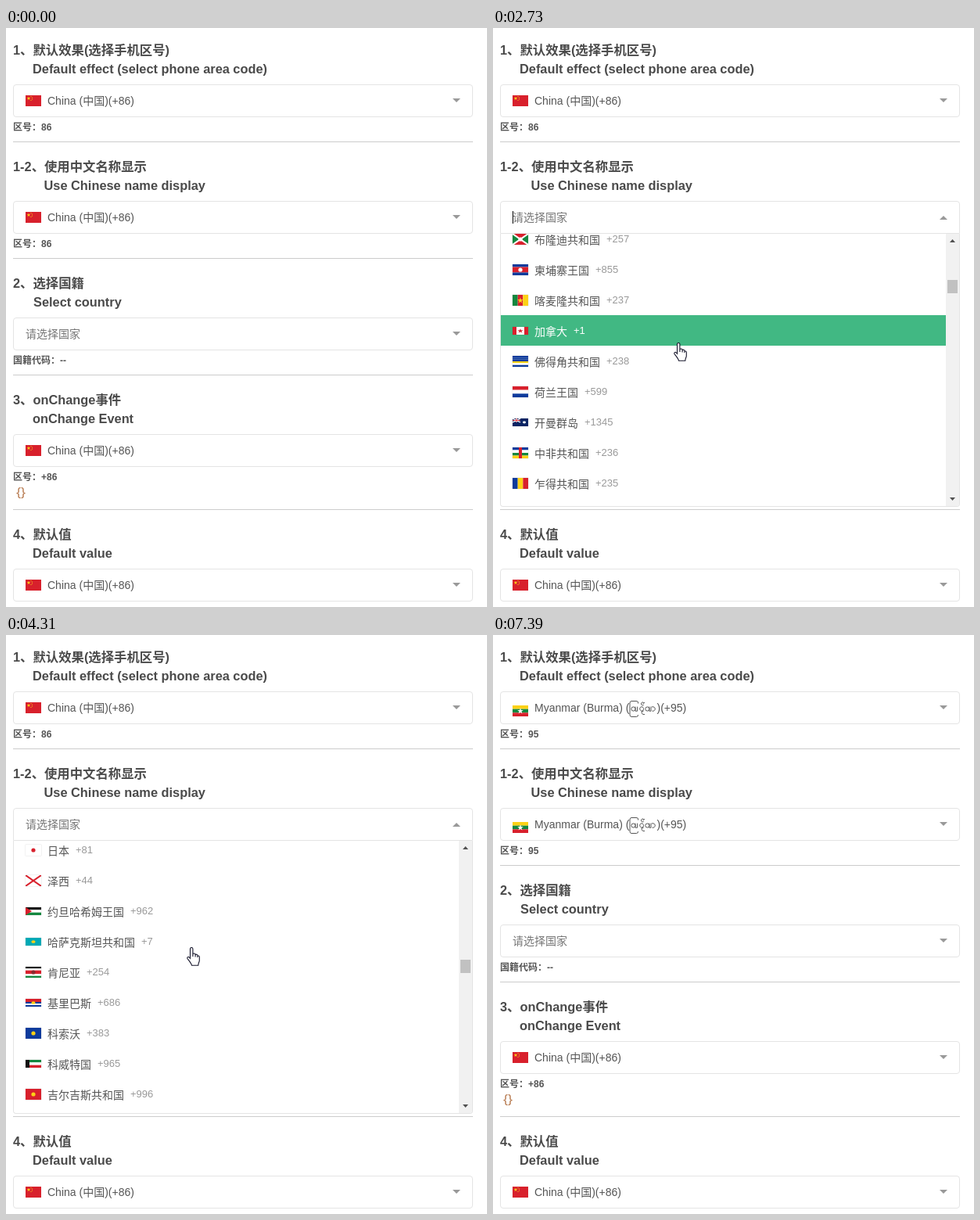
An HTML page for the animation above (8.02 s loop, 615 by 740 pixels).

```html
<!DOCTYPE html>
<html lang="zh-CN">
<head>
<meta charset="utf-8">
<title>Country select</title>
<style>
html, body { margin: 0; width: 100%; height: 100%; overflow: hidden; background: #fff; }
body { position: relative; color: #555; font: 14px "Liberation Sans", Arial, "Noto Sans CJK SC", "Noto Sans CJK", sans-serif; }
div, svg.at { position: absolute; white-space: nowrap; box-sizing: border-box; }
.title { font-weight: bold; font-size: 16.38px; line-height: 24px; color: #4a4a4a; }
.note { left: 9px; font-weight: bold; font-size: 12px; line-height: 18px; }
.rule { left: 9px; width: 588px; height: 1px; background: #ccc; }
.select { left: 9px; width: 588px; height: 42px; border: 1px solid #e4e4e4; border-radius: 4px; line-height: 40px; }
.select.open { border-radius: 4px 4px 0 0; }
.hint { left: 15px; color: #757575; }
.label { left: 43px; }
.caret { left: 15px; top: 12px; width: 1px; height: 16px; background: #000; }
.arrow { left: 561px; top: 17px; width: 10px; height: 5px; background: #999; clip-path: polygon(0 0, 100% 0, 50% 100%); }
.turn { left: 0; top: 0; width: 586px; height: 40px; transform-origin: 566px 20px; }
.list { left: 9px; top: 263px; width: 588px; height: 349px; background: #fff; border: 1px solid #e4e4e4; border-top: 0; border-radius: 0 0 4px 4px; overflow: hidden; }
.row { left: 0; width: 569px; height: 39px; padding-left: 15px; display: flex; align-items: center; }
.row svg { margin-right: 8px; box-shadow: 0 0 1px rgba(0, 0, 0, .3); }
.row i { font: 13px "Liberation Sans", Arial, sans-serif; color: #999; margin-left: 8px; }
.row.on { background: #41b883; color: #fff; }
.row.on i { color: #fff; }
.bar { left: 569px; top: 0; width: 17px; height: 348px; background: #f1f1f1; }
.thumb { left: 2px; width: 13px; height: 17px; background: #c1c1c1; }
.tip { left: 5px; width: 7px; height: 4px; background: #505050; }
.code { left: 13px; top: 583px; line-height: 20px; font: 300 16px/20px "Noto Sans", sans-serif; color: #b5764a; }
</style>
</head>
<body>
<script>
const LOOP = 8020, ROW = 39, FIRST = 23;

// name, dial code, flag: (= low | - narrow) stripe direction, stripe colours, then shape + colour pairs
const COUNTRIES = `不丹王国 975 hYfOoW,玻利维亚国 591 hRYG,波斯尼亚和黑塞哥维那 387 =hBjY,博茨瓦纳 267 hLLLWKWLLL,巴西联邦共和国 55 hGrYoB,
英属印度洋领地 246 =hLWLWLWLkR,英属维尔京群岛 1284 =hNkReW,文莱达鲁萨兰国 673 =hYgKoR,保加利亚共和国 359 hWGR,布基纳法索 226 hRGsY,
布隆迪共和国 257 hRyGxWoW,柬埔寨王国 855 hBRRBoW,喀麦隆共和国 237 vGRYsY,加拿大 1 =vRWWRsR,佛得角共和国 238 hBBBYWB,
荷兰王国 599 hRWB,开曼群岛 1345 =hNkReW,中非共和国 236 hBWGYwR,乍得共和国 235 vBYR,智利 56 hWRcB,
中国 86 hRaY,圣诞岛 61 =hBfGoY,科科斯群岛 61 =hGoY,哥伦比亚 57 hYYBR,科摩罗 269 hYWRBtG,
刚果民主共和国 243 hLdRaY,刚果共和国 242 hGfRdY,库克群岛 682 =hNkReW,哥斯达黎加 506 hBWRRWB,科特迪瓦 225 vOWG,
克罗地亚 385 =hRWBoR,古巴 53 =hBWBWBtR,库拉索 599 hBBBBYB,塞浦路斯 357 hWoO,捷克共和国 420 hWRtB,
丹麦 45 hRpW,吉布提共和国 253 hLGtW,多米尼克国 1767 =hGmYoR,多米尼加共和国 1 hBzRmW,厄瓜多尔 593 hYYBRoM,
埃及 20 hRWKoY,萨尔瓦 503 =hBWBoL,赤道几内亚 240 hGWRtB,厄立特里亚 291 =hGLiR,爱沙尼亚共和国 372 hLKW,
埃塞俄比亚 251 =hGYRoB,福克兰群岛 500 =hNkReW,法罗群岛 298 hWpR,斐济 679 =hLkReW,芬兰 358 hWpB,
法国 33 vBWR,法属圭亚那 594 hGfY,法属波利尼西亚 689 hRWWRoY,加蓬 241 hGYB,冈比亚 220 hRBG,
格鲁吉亚 995 hWmR,德国 49 hKRY,加纳 233 hRYGsK,直布罗陀 350 =hWWRoR,希腊 30 hBWBWBWBWBcB,
格陵兰 299 hWRoR,格林纳达 1473 hYGoR,瓜德罗普 590 hKGoY,关岛 1671 hBoW,危地马拉 502 vLWL,
根西岛 44 hWmR,几内亚 224 vRYG,几内亚比绍 245 =hYGbR,圭亚那 592 hGiYtR,海地 509 hBRoW,
洪都拉斯 504 =hBWBoB,香港 852 hRoW,匈牙利 36 =hRWG,冰岛 354 hBpR,印度 91 hOWGoB,
印度尼西亚 62 hRW,伊朗 98 hGWRoR,伊拉克 964 hRWKoG,爱尔兰 353 =vGWO,马恩岛 44 =hRoW,
以色列 972 hBWWWBsB,意大利 39 vGWR,牙买加 1876 =hGyKxY,日本 81 hWoR,泽西 44 hWxR,
约旦哈希姆王国 962 =hKWGtR,哈萨克斯坦共和国 7 =hToY,肯尼亚 254 hKWRRWGoM,基里巴斯 686 =hRRBWBoY,科索沃 383 hBoY,
科威特国 965 =hGWRbK,吉尔吉斯共和国 996 hRoY,老挝 856 hRBBRoW,拉脱维亚 371 =hMMWMM,黎巴嫩 961 hRWWRoG,
莱索托 266 hBWGoK,利比里亚 231 =hRWRWRWRWRcB,利比亚 218 =hRKKGoW,列支敦士登 423 hBR,立陶宛 370 hYGR,
卢森堡 352 hRWL,澳门 853 hGoW,马其顿 389 =hRxYoY,马达加斯加 261 hRGbW,马拉维 265 hKRG,
马来西亚 60 =hRWRWRWRWcB,马尔代夫 960 hRoG,马里 223 vGYR,马耳他 356 vWR,马绍尔群岛 692 =hBdO,
马提尼克 596 hBmW,毛里塔尼亚 222 hGoY,毛里求斯 230 hRBYG,马约特 262 vBWR,墨西哥 52 =vGWRoO,
密克罗尼西亚 691 =hLoW,摩尔多瓦 373 =vBYRoM,摩纳哥 377 hRW,蒙古 976 =vRBR,黑山 382 =hRoY,
蒙特塞拉特岛 1664 =hNkReW,摩洛哥 212 hR,莫桑比克 258 hGKYtR,缅甸联邦共和国 95 hYGRsW,纳米比亚 264 hBfGdWnR,
瑙鲁 674 =hNNNYNNN,尼泊尔 977 -hW^R,荷兰 31 hRWB,新喀里多尼亚 687 =hBRGqY,新西兰 64 =hNkReR`.split(/,\s*/).map(s => s.split(' '));

const INK = { R: '#d8202c', W: '#fff', B: '#0d3b9c', G: '#14873f', Y: '#fcd116', K: '#111', L: '#6fb1e0', N: '#0a2463', O: '#f58220', M: '#8a2a30', T: '#00a9b5' };
const fill = d => c => `<path d="${d}" fill="${c}"/>`;
const line = (d, w) => c => `<path d="${d}" stroke="${c}" stroke-width="${w}"/>`;
const dot = (x, y, r) => c => `<circle cx="${x}" cy="${y}" r="${r}" fill="${c}"/>`;
const star = (x, y, r) => {
  const pt = k => [x + r * Math.sin(k * Math.PI * .8), y - r * Math.cos(k * Math.PI * .8)];
  return fill('M' + [0, 1, 2, 3, 4].map(pt).join('L') + 'Z');
};
const SHAPES = {
  o: dot(10, 7, 2.6), q: dot(6.5, 7, 3), e: dot(15, 7, 2), s: star(10, 7.3, 4),
  a: c => star(4, 4, 2.6)(c) + [[7, 1.5], [8.5, 3], [8.5, 5], [7, 6.5]].map(p => dot(...p, .6)(c)).join(''),
  t: fill('M0 0L8 7L0 14Z'), i: fill('M0 0L20 7L0 14Z'), f: fill('M20 0V14H0Z'), j: fill('M6 0H16V14Z'),
  r: fill('M10 1.5L18 7L10 12.5L2 7Z'), y: fill('M0 0L10 7L0 14ZM20 0L10 7L20 14Z'),
  z: fill('M10 0H20V7H10ZM0 7H10V14H0Z'), '^': fill('M0 0L20 7H8L20 14H0Z'),
  c: fill('M0 0H9V7H0Z'), b: fill('M0 0H5V14H0Z'), w: fill('M8 0H12V14H8Z'),
  x: line('M0 0L20 14M20 0L0 14', 2), p: line('M7 0V14M0 7H20', 3), m: line('M10 0V14M0 7H20', 3),
  d: line('M-2 15L22 -1', 5), n: line('M-2 15L22 -1', 3.2), g: line('M0 3L20 11', 3.5),
  k: c => fill('M0 0H10V7H0Z')(INK.N) + line('M0 0L10 7M10 0L0 7M5 0V7M0 3.5H10', 1.6)('#fff') + line('M5 0V7M0 3.5H10', 1)(c)
};

function flag(spec, css = '') {
  const [, size, dir, stripes, extra] = spec.match(/^([=-]?)([hv])([A-Z]+)(.*)$/);
  const n = stripes.length;
  let art = [...stripes].map((c, i) => dir === 'h'
    ? `<rect y="${14 * i / n}" width="20" height="${14 / n}" fill="${INK[c]}"/>`
    : `<rect x="${20 * i / n}" width="${20 / n}" height="14" fill="${INK[c]}"/>`).join('');
  for (const [, op, c] of extra.matchAll(/(.)([A-Z])/g)) art += SHAPES[op](INK[c]);
  return `<svg width="${size === '-' ? 13 : 20}" height="${size === '=' ? 10 : 14}" viewBox="0 0 20 14" preserveAspectRatio="none" ${css}>${art}</svg>`;
}

function add(parent, cls, html = '', style = {}) {
  const el = document.createElement('div');
  el.className = cls;
  el.innerHTML = html;
  Object.assign(el.style, style);
  parent.append(el);
  return el;
}
const px = v => v + 'px';

// Page
const BURMESE = '<svg width="35.2" height="23" viewBox="0 0 35.2 23" fill="none" stroke="#555" style="vertical-align:-8px"><path d="M11.5 4.5V3Q11.5 1.5 9 1.5H3Q1 1.5 1 4V19Q1 21.5 3 21.5H9.5Q11.5 21.5 11.5 19"/><circle cx="5.5" cy="11.5" r="2.6"/><path d="M8 8.6V14.2H10.6V8.6M18.5 14.2C13 15.5 12.5 8.8 16 8.8S19 14 16.5 14.2Q15 19 20 18.5M18.8 3.6A1.9 1.9 0 1 0 18.8 6.2M20 3.4L17.6 4.6M29 8.9C34.6 7.6 34.6 15 29.5 14.2"/><circle cx="23.4" cy="11.5" r="2.6"/><path d="M25.8 8.6V14.2H28V8.6"/></svg>';
const selected = {
  cn: flag('hRaY', 'class="at" style="left:15px;top:13px"') + '<div class="label">China (中国)(+86)</div>',
  mm: flag('hYGRsW', 'class="at" style="left:15px;top:17px"') + `<div class="label">Myanmar (Burma) (${BURMESE})(+95)</div>`,
  none: '<div class="hint">请选择国家</div>'
};
const sections = [
  [16, '1、默认效果(选择手机区号)', 'Default effect (select phone area code)', 34, '区号：86', 129],
  [165, '1-2、使用中文名称显示', 'Use Chinese name display', 48.5, '区号：86', 129],
  [314, '2、选择国籍', 'Select country', 35, '国籍代码：--', 129],
  [463, '3、onChange事件', 'onChange Event', 34, '区号：+86', 152],
  [635, '4、默认值', 'Default value', 34]
].map(([top, zh, en, x, note, rule], i) => {
  add(document.body, 'title', zh, { left: '9px', top: px(top) });
  add(document.body, 'title', en, { left: px(x), top: px(top + 24) });
  const box = add(document.body, 'select', '', { top: px(top + 56) });
  const value = add(box, '', selected[i === 2 ? 'none' : 'cn'], { left: 0, top: 0 });
  const turn = add(box, 'turn');
  add(turn, 'arrow');
  if (rule) add(document.body, 'rule', '', { top: px(top + rule) });
  return { top: top + 56, box, value, turn, note: note && add(document.body, 'note', note, { top: px(top + 102) }) };
});
add(document.body, 'code', '{}');
const [main, active] = sections;
const caret = add(active.box, 'caret');

const list = add(document.body, 'list');
const inner = add(list, '', '', { left: 0, top: 0 });
const rows = COUNTRIES.map(([name, dial, art], i) =>
  add(inner, 'row', `${flag(art)}<span>${name}</span><i>+${dial}</i>`, { top: px((i + FIRST) * ROW) }));
const bar = add(list, 'bar');
const thumb = add(bar, 'thumb');
add(bar, 'tip', '', { top: '7px', clipPath: 'polygon(50% 0,100% 100%,0 100%)' });
add(bar, 'tip', '', { top: '337px', clipPath: 'polygon(0 0,100% 0,50% 100%)' });

// Pointers: hot spot and drawing
const pointers = {
  arrow: [0, 0, '<path d="M.5 .5V16L4 12.7L6.5 18.3L9 17.2L6.5 11.8H11.5Z" fill="#fff" stroke="#000"/>'],
  beam: [3.5, 8, '<path d="M0 .5H3M4 .5H7M3.5 1V16M0 16.5H3M4 16.5H7" stroke="#000"/>'],
  hand: [6, 0, '<path d="M4.5 13V2.2a1.7 1.7 0 0 1 3.4 0V9c.4-1.5 3-1.4 3.2.3V10c.5-1.3 2.6-1 2.8.5V11.5c.6-1 2.4-.6 2.4 1V17c0 2-1.5 3-1.5 6.3H6.5C6 20.5 3 17.5 1 14.5C.2 13 2 11.6 3.3 13L4.5 14.3ZM7.9 9V12M11.1 10V12.5M13.9 11V13" fill="#fff" stroke="#15152a" stroke-width="1.1"/>']
};
for (const k in pointers) {
  const art = pointers[k][2];
  pointers[k][2] = add(document.body, '', `<svg class="at" width="18" height="25">${art}</svg>`, { left: 0, top: 0 });
}

// Motion
const beats = [[170, 960, 11], [1020, 1340, 5], [1740, 2040, 5], [2190, 2970, 11], [3120, 3910, 11], [4310, 4370, 2],
  [4690, 4920, 4], [5240, 5240, 1], [5380, 5380, 1], [5780, 5930, 3], [6080, 6840, 11], [6930, 7390, 7]];
const path = [[170, 529, 728], [960, 282, 233], [1680, 282, 233], [2040, 237, 405], [2400, 237, 402], [3080, 237, 402],
  [3190, 242, 397], [3910, 236.5, 399], [5700, 236.5, 399], [5780, 228, 388], [5930, 229, 386], [6380, 229, 386],
  [6840, 274, 392], [7320, 502, 706]];
const scroll = [[2140, 900], [2640, 1300], [2740, 1300], [2970, 2200], [3080, 2200], [3190, 2304], [3215, 2304], [3910, 4100],
  [4290, 4100], [4310, 4141.5], [4370, 4200], [4640, 4200], [4920, 5600]];

function snap(t) {
  let s = 0;
  for (const [a, b, n] of beats) {
    const step = n > 1 ? (b - a) / (n - 1) : 1;
    if (t >= a) s = Math.min(b, a + Math.floor((t - a) / step + 1e-6) * step);
  }
  return s;
}
function ease(u) {
  u = Math.max(0, Math.min(1, u));
  return u * u * (3 - 2 * u);
}
function track(keys, t) {
  const i = keys.findIndex(k => k[0] > t);
  if (i < 1) return keys.at(i).slice(1);
  const a = keys[i - 1], b = keys[i], u = ease((t - a[0]) / (b[0] - a[0]));
  return a.slice(1).map((v, k) => v + (b[k + 1] - v) * u);
}
function hovered(t, y) {
  const at = s => y < 263 ? -1 : Math.floor((y - 263 + s) / ROW);
  if (t < 2560) return at(900);
  if (t < 3000) return 36;
  return t < 5240 ? -1 : t < 6080 ? at(5600) : 146;
}
function put(el, html) {
  if (el.now !== html) el.innerHTML = el.now = html;
}

function render(time) {
  const t = snap(time);
  const [x, y] = track(path, t), [s] = track(scroll, t);
  const open = t >= 1020 && t < 6080, done = t >= 6080;
  const shown = ease(Math.min((t - 990) / 330, (6390 - t) / 330));

  put(main.value, done ? selected.mm : selected.cn);
  put(active.value, open ? selected.none : main.value.now);
  for (const sec of [main, active]) put(sec.note, done ? '区号：95' : '区号：86');
  active.box.classList.toggle('open', open);
  active.turn.style.transform = `rotate(${180 * shown}deg)`;
  caret.hidden = !(open && (t < 1870 || (t % 1000 >= 370 && t % 1000 < 870)));
  caret.style.display = caret.hidden ? 'none' : '';

  list.style.display = shown > 0 ? '' : 'none';
  list.style.opacity = shown;
  list.style.transform = `translateY(${110 * (1 - shown)}px)`;
  inner.style.transform = `translateY(${-Math.round(s)}px)`;
  thumb.style.top = px(17 + Math.round(s * .0325));
  const hot = hovered(t, y) - FIRST;
  rows.forEach((r, i) => r.classList.toggle('on', i === hot));

  const kind = open && y >= 263 ? 'hand' : sections.some(c => y >= c.top && y < c.top + 42) ? 'beam' : 'arrow';
  for (const k in pointers) {
    const [hx, hy, el] = pointers[k];
    el.style.display = k === kind && t >= 170 && t < 7390 ? '' : 'none';
    el.style.transform = `translate(${Math.round(x - hx)}px, ${Math.round(y - hy)}px)`;
  }
}

const start = performance.now();
(function tick() {
  render((performance.now() - start) % LOOP);
  requestAnimationFrame(tick);
})();
</script>
</body>
</html>
```
